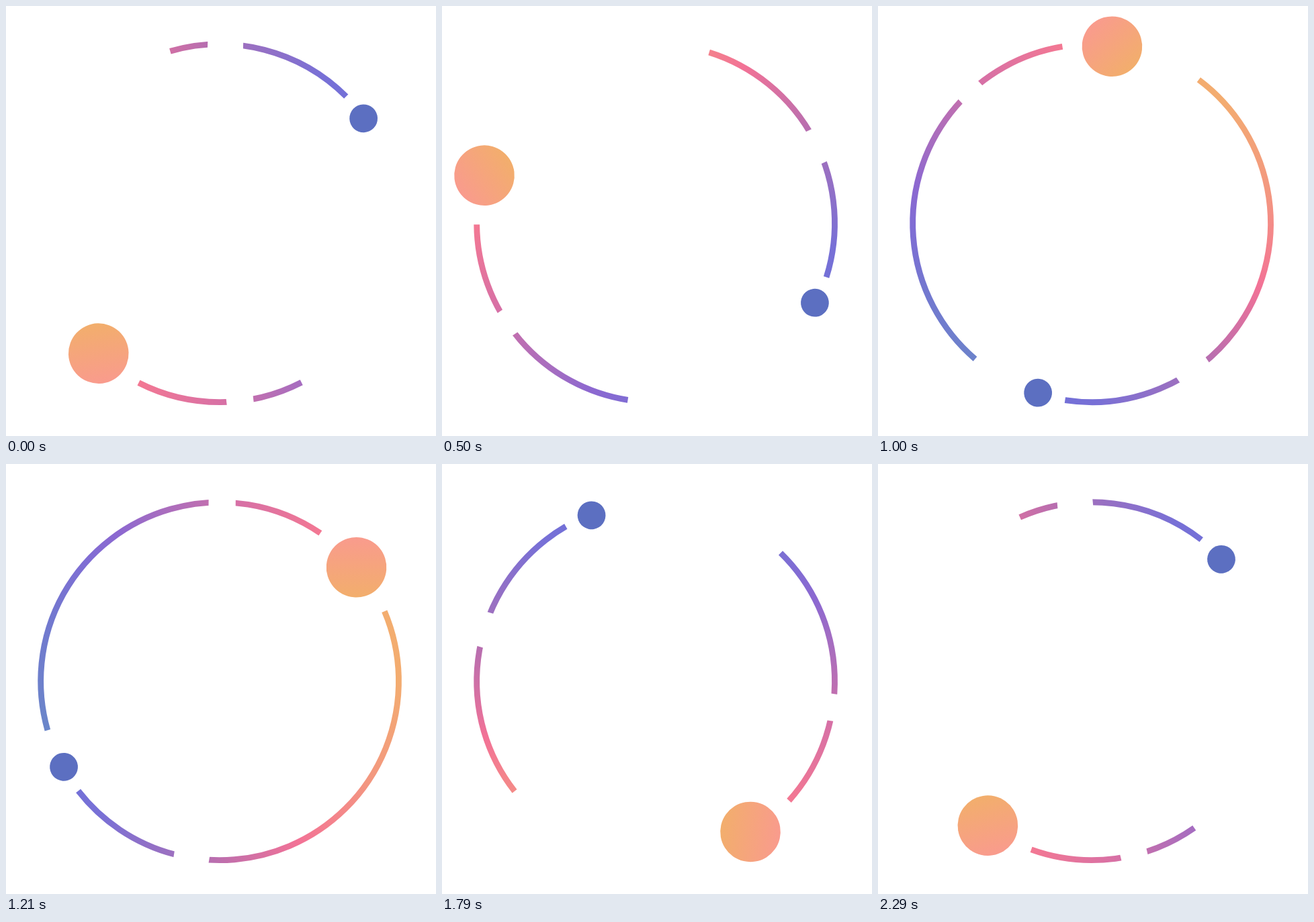
Recreate the animation shown at these times as an HTML page with a canvas. Size 640x640 px, loop 2370 ms.

```html
<!DOCTYPE html>
<html lang="en">
<head>
<meta charset="utf-8">
<title>Orbit</title>
<style>
  html, body { margin: 0; height: 100%; overflow: hidden; background: #fff; }
  canvas { display: block; width: 100vmin; height: 100vmin; }
</style>
</head>
<body>
<canvas id="stage" width="640" height="640"></canvas>
<script>
const ctx = document.getElementById('stage').getContext('2d');
const LOOP = 2370, FRAMES = 33, FPS = 14;
const SPAN = 71; // timeline ticks per loop, 30 per second
const CENTER = [318.1, 323.25], RING = 266.4, ORBIT = 264.8, LINE = 8.8;
const rad = deg => deg * Math.PI / 180;

// tick, orbit angle, start of warm arc, start of cool arc (degrees)
const KEYS = [
  [0, 132.93, 121, 289.9],
  [15, 195.57, 91.8, 263.4],
  [24, 241.07, 51.3, 230.5],
  [37, 320.2, 16.8, 203.9],
  [43, 356.6, 30.2, 214.3],
  [54, 417.85, 84.2, 256.4],
  [69, 485.75, 120.6, 289.3]
];

// Colours around the ring, by angle from the large ball
const COLORS = [
  [0, '#f3ae6e'], [40, '#f3ac70'], [74, '#f39780'], [88, '#f4868a'],
  [104, '#f27296'], [133, '#b76eb0'], [145, '#9c70c0'], [172, '#7870d6'],
  [190, '#7070d8'], [191, '#6a88c8'], [204, '#6a86c9'], [240, '#7278cf'],
  [262, '#7f6dd4'], [276, '#8d68d0'], [290, '#a66dc0'], [306, '#c06fb0'],
  [315, '#d670a6'], [344, '#f37893'], [350, '#f37893']
];

function key(i) {
  const n = KEYS.length, turn = Math.floor(i / n);
  const [tick, angle, warm, cool] = KEYS[i - turn * n];
  return [tick + turn * SPAN, angle + turn * 360, warm, cool];
}

function rate(i, c) {
  const p = key(i), q = key(i + 1);
  return (q[c] - p[c]) / (q[0] - p[0]);
}

// Monotone tangent at a key
function tangent(i, c) {
  const before = rate(i - 1, c), after = rate(i, c);
  if (before * after <= 0) return 0;
  const h0 = key(i)[0] - key(i - 1)[0], h1 = key(i + 1)[0] - key(i)[0];
  const w0 = h0 + 2 * h1, w1 = 2 * h0 + h1;
  return (w0 + w1) / (w0 / before + w1 / after);
}

function valueAt(tick, c) {
  let i = KEYS.length - 1;
  while (KEYS[i][0] > tick) i--;
  const p = key(i), q = key(i + 1), h = q[0] - p[0];
  const u = (tick - p[0]) / h, v = 1 - u;
  return v * v * (1 + 2 * u) * p[c] + u * u * (3 - 2 * u) * q[c]
    + h * u * v * (v * tangent(i, c) - u * tangent(i + 1, c));
}

function arc(from, to) {
  ctx.beginPath();
  ctx.arc(0, 0, RING, rad(from), rad(to));
  ctx.stroke();
}

function gap(angle, width) {
  ctx.save();
  ctx.rotate(rad(angle));
  ctx.fillStyle = '#fff';
  ctx.fillRect(RING - 12, -width / 2, 24, width);
  ctx.restore();
}

function ball(angle, radius, fill) {
  ctx.fillStyle = fill;
  ctx.beginPath();
  ctx.arc(ORBIT * Math.cos(rad(angle)), ORBIT * Math.sin(rad(angle)), radius, 0, 2 * Math.PI);
  ctx.fill();
}

const ringPaint = ctx.createConicGradient(0, 0, 0);
COLORS.forEach(([angle, color]) => ringPaint.addColorStop(angle / 360, color));

const BALL = 44.8, tilt = rad(129.7);
const dx = BALL * Math.cos(tilt), dy = BALL * Math.sin(tilt);
const ballPaint = ctx.createLinearGradient(ORBIT - dx, -dy, ORBIT + dx, dy);
ballPaint.addColorStop(0, '#f99b8d');
ballPaint.addColorStop(1, '#f2ae6c');

function draw(now) {
  const time = now % LOOP;
  let frame = FRAMES - 1;
  while (Math.round(frame * 100 / FPS) * 10 > time) frame--;
  const tick = Math.ceil(frame * 15 / 7);

  ctx.setTransform(1, 0, 0, 1, 0, 0);
  ctx.fillStyle = '#fff';
  ctx.fillRect(0, 0, 640, 640);
  ctx.translate(...CENTER);
  ctx.rotate(rad(valueAt(tick, 1)));

  ctx.lineWidth = LINE;
  ctx.strokeStyle = ringPaint;
  arc(valueAt(tick, 2), 182);
  arc(valueAt(tick, 3), 344);
  gap(138.9, 52.9);
  gap(310.57, 40.2);
  ball(0, BALL, ballPaint);
  ball(191, 20.9, '#5c6fc1');
}

const start = performance.now();
function loop() {
  draw(performance.now() - start);
  requestAnimationFrame(loop);
}
loop();
</script>
</body>
</html>
```
